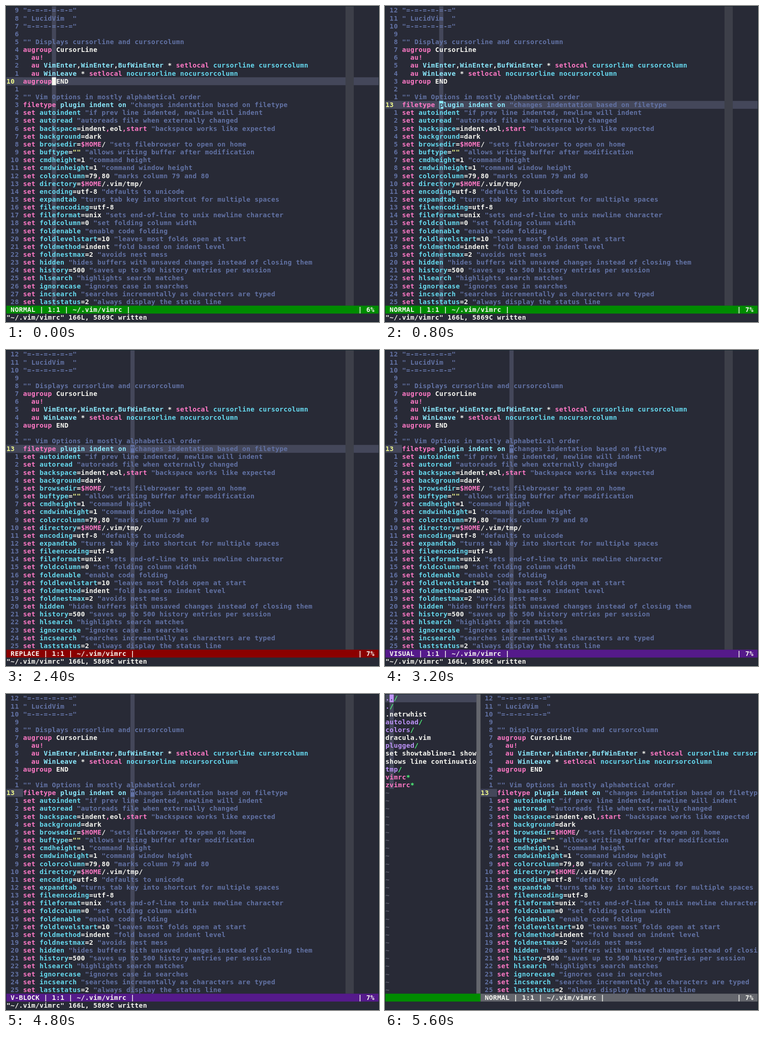
Recreate the animation shown at these times as an HTML page with a canvas. Size 814x688 px, loop 6400 ms.

```html
<!DOCTYPE html>
<html lang="en">
<head>
<meta charset="utf-8">
<title>Editor modes</title>
<style>
html, body { margin: 0; width: 100%; height: 100%; overflow: hidden; background: #10212a; }
canvas { display: block; }
</style>
</head>
<body>
<canvas id="stage" width="814" height="688"></canvas>
<script>
const ctx = document.getElementById('stage').getContext('2d');
const CELL_W = 10, CELL_H = 19, COLS = 90, TEXT_ROWS = 38;
const SCALE = 814 / 902;
const STEP_MS = 800;

const color = {
  edge: '#10212a', back: '#282a36', line: '#44475a', ruler: '#3d3f49', grey: '#64666d',
  plain: '#f8f8f2', comment: '#6272a4', key: '#ff79c6', option: '#66d9ef',
  event: '#8be9fd', string: '#f1fa8c', dir: '#bd93f9', mark: '#50fa7b', tilde: '#5a5c69',
  green: '#008b00', blue: '#00008b', red: '#8b0000', purple: '#551a8b'
};

const source = `"=-=-=-=-=-="
" LucidVim  "
"=-=-=-=-=-="

"" Displays cursorline and cursorcolumn
augroup CursorLine
  au!
  au VimEnter,WinEnter,BufWinEnter * setlocal cursorline cursorcolumn
  au WinLeave * setlocal nocursorline nocursorcolumn
augroup END

"" Vim Options in mostly alphabetical order
filetype plugin indent on "changes indentation based on filetype
set autoindent "if prev line indented, newline will indent
set autoread "autoreads file when externally changed
set backspace=indent,eol,start "backspace works like expected
set background=dark
set browsedir=$HOME/ "sets filebrowser to open on home
set buftype="" "allows writing buffer after modification
set cmdheight=1 "command height
set cmdwinheight=1 "command window height
set colorcolumn=79,80 "marks column 79 and 80
set directory=$HOME/.vim/tmp/
set encoding=utf-8 "defaults to unicode
set expandtab "turns tab key into shortcut for multiple spaces
set fileencoding=utf-8
set fileformat=unix "sets end-of-line to unix newline character
set foldcolumn=0 "set folding column width
set foldenable "enable code folding
set foldlevelstart=10 "leaves most folds open at start
set foldmethod=indent "fold based on indent level
set foldnestmax=2 "avoids nest mess
set hidden "hides buffers with unsaved changes instead of closing them
set history=500 "saves up to 500 history entries per session
set hlsearch "highlights search matches
set ignorecase "ignores case in searches
set incsearch "searches incrementally as characters are typed
set laststatus=2 "always display the status line`.split('\n');

const files = ['../', './', '.netrwhist', 'autoload/', 'colors/', 'dracula.vim', 'plugged/',
  'set showtabline=1 show', 'shows line continuatio', 'tmp/', 'vimrc*', 'zvimrc*'];

const syntax = new RegExp([
  '(?<comment>(?:^| )".*$)',
  '(?<string>"")',
  '(?<option>(?<=^set |setlocal.* )\\w+)',
  '(?<event>\\w+Enter|WinLeave|plugin|indent(?= on)|on\\b)',
  '(?<key>augroup|au!?|setlocal|set|filetype|start|\\$HOME|,(?=eol|start|80))'
].join('|'), 'g');

// Cursor columns count from the left edge of the window, line numbers included.
const steps = [
  { mode: 'NORMAL', bar: color.green, row: 9, col: 11, cursor: color.plain, percent: '6%', cursorline: true },
  { mode: 'NORMAL', bar: color.green, row: 12, col: 13, cursor: color.event, cursorline: true },
  { mode: 'INSERT', bar: color.blue, row: 12, col: 30, cursorline: true },
  { mode: 'REPLACE', bar: color.red, row: 12, col: 30, cursorline: true },
  { mode: 'VISUAL', bar: color.purple, row: 12, col: 30 },
  { mode: 'V-LINE', bar: color.purple, row: 12, col: 30, selectLine: true },
  { mode: 'V-BLOCK', bar: color.purple, row: 12, col: 30 },
  { mode: 'NORMAL', bar: color.grey, row: 12, explorer: true }
];

function fill(col, row, cols, rows, style) {
  ctx.fillStyle = style;
  ctx.fillRect(1 + col * CELL_W, 1 + row * CELL_H, cols * CELL_W, rows * CELL_H);
}

function write(text, col, row, style = color.plain) {
  ctx.fillStyle = style;
  [...text].forEach((char, i) => {
    if (char !== ' ' && col + i < COLS) {
      ctx.fillText(char, 1.2 + (col + i) * CELL_W, 16 + row * CELL_H);
    }
  });
}

function writeCode(text, col, row) {
  let end = 0;
  for (const match of text.matchAll(syntax)) {
    write(text.slice(end, match.index), col + end, row);
    const kind = Object.keys(match.groups).find(name => match.groups[name] !== undefined);
    write(match[0], col + match.index, row, color[kind]);
    end = match.index + match[0].length;
  }
  write(text.slice(end), col + end, row);
}

function drawCursor(char, col, row, style, ink) {
  fill(col, row, 1, 1, style);
  write(char, col, row, ink);
}

function drawBuffer(step, left) {
  if (!step.explorer) {
    fill(step.col, 0, 1, TEXT_ROWS, color.line);
    if (step.cursorline) fill(0, step.row, COLS, 1, color.line);
    if (step.selectLine) fill(4, step.row, source[step.row].length + 1, 1, color.line);
    fill(82, 0, 2, TEXT_ROWS, color.ruler);
  }
  fill(left, step.row, 4, 1, color.line);
  source.forEach((text, row) => {
    const current = row === step.row;
    const number = current ? String(row + 1) : String(Math.abs(row - step.row)).padStart(3);
    write(number, left, row, current ? color.string : color.comment);
    writeCode(text, left + 4, row);
  });
  if (!step.explorer) {
    const ink = step.cursorline ? color.line : color.back;
    drawCursor(source[step.row][step.col - 4], step.col, step.row, step.cursor || color.comment, ink);
  }
}

function drawExplorer() {
  fill(0, 0, 22, 1, color.line);
  fill(1, 0, 1, files.length, color.line);
  fill(22, 0, 1, TEXT_ROWS, color.grey);
  files.forEach((name, row) => {
    const suffix = name.match(/[/*]$/)?.[0] || '';
    const base = name.slice(0, name.length - suffix.length);
    const style = { '/': color.dir, '*': color.key }[suffix] || color.plain;
    write(base, 0, row, style);
    write(suffix, base.length, row, color.mark);
  });
  for (let row = files.length; row < TEXT_ROWS; row++) write('~', 0, row, color.tilde);
  drawCursor('.', 1, 0, color.dir, color.line);
  fill(0, TEXT_ROWS, 23, 1, color.green);
}

function draw(step) {
  const left = step.explorer ? 23 : 0;
  ctx.setTransform(1, 0, 0, 1, 0, 0);
  ctx.fillStyle = color.edge;
  ctx.fillRect(0, 0, 814, 688);
  ctx.fillStyle = color.back;
  ctx.fillRect(1, 1, 812, 686);
  ctx.setTransform(SCALE, 0, 0, SCALE, 0, 0);
  ctx.font = 'bold 16px "DejaVu Sans Mono", monospace';

  drawBuffer(step, left);
  if (step.explorer) drawExplorer();

  fill(left, TEXT_ROWS, COLS - left, 1, step.bar);
  write(` ${step.mode} | 1:1 | ~/.vim/vimrc |`, left, TEXT_ROWS);
  write('| ' + (step.percent || '7%'), 85, TEXT_ROWS);
  if (!step.explorer) write('"~/.vim/vimrc" 166L, 5869C written', 0, TEXT_ROWS + 1);
}

const start = performance.now();
let shown = -1;

function tick() {
  const index = Math.floor((performance.now() - start) / STEP_MS) % steps.length;
  if (index !== shown) draw(steps[shown = index]);
  requestAnimationFrame(tick);
}
tick();
</script>
</body>
</html>
```
